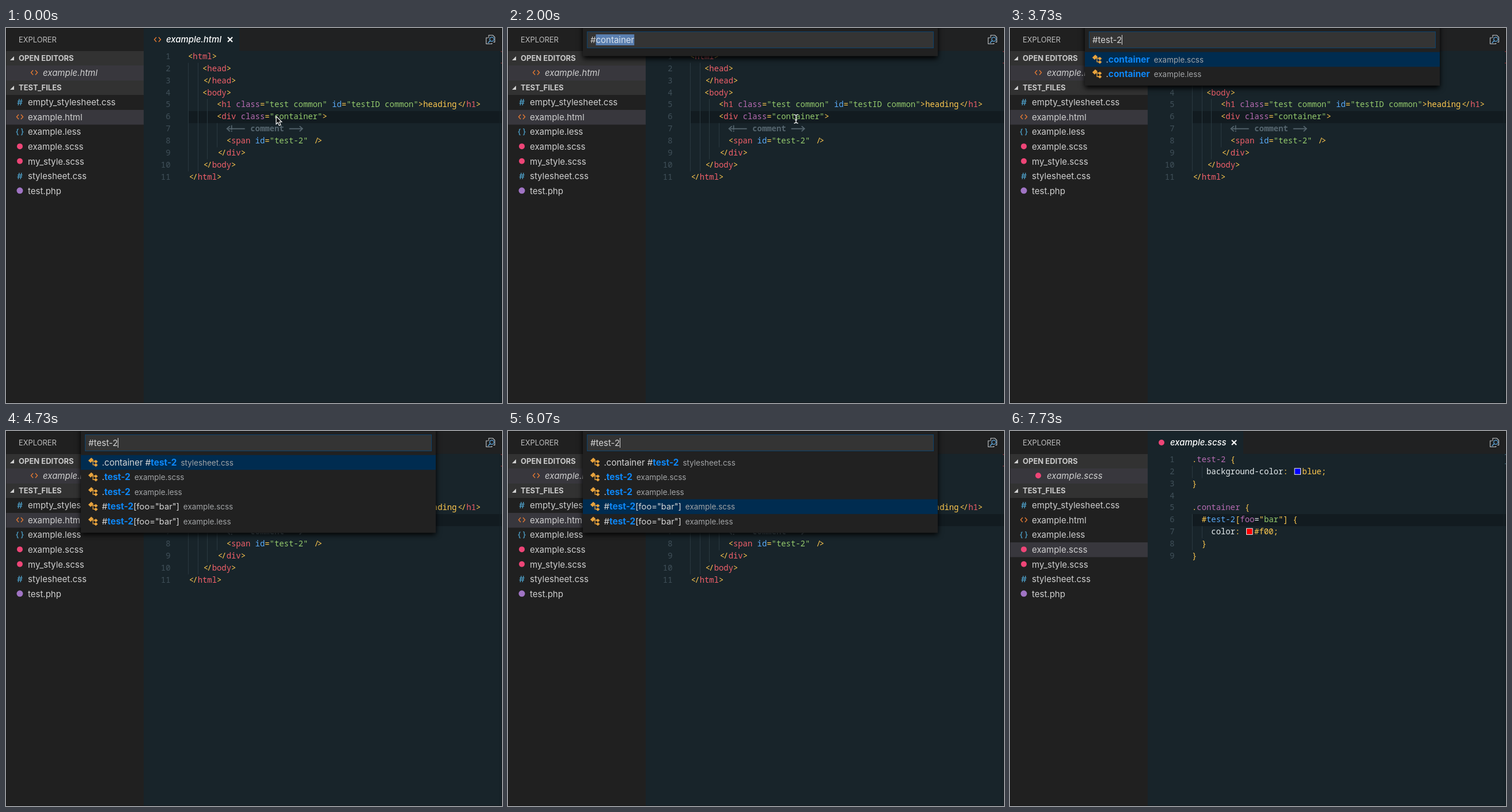
Recreate the animation shown at these times as an HTML page with a canvas. Size 861 by 650 pixels, loop 7.87 s.

```html
<!DOCTYPE html>
<html lang="en">
<head>
<meta charset="utf-8">
<title>Symbol search</title>
<style>
html, body { margin: 0; width: 100%; height: 100%; overflow: hidden; background: #18242a; }
canvas { display: block; width: 861px; height: 650px; }
</style>
</head>
<body>
<canvas id="stage"></canvas>
<script>
const W = 861, H = 650, LOOP = 7870;
const canvas = document.getElementById('stage');
const ctx = canvas.getContext('2d');
const dpr = window.devicePixelRatio || 1;
canvas.width = W * dpr;
canvas.height = H * dpr;

const UI = 'Inter, Roboto, sans-serif';
const MONO = '"Noto Sans Mono", "DejaVu Sans Mono", monospace';
const CODE_X = 316, CHAR = 8.33, LINE = 20.87, CODE_TOP = 39.5, ROW = 25.55;

const COLORS = {
  y: '#ffc94f', r: '#f0606a', p: '#b76cb3', b: '#5aaaf6',
  g: '#93c96c', w: '#e9eff1', c: '#56666f'
};

// Each line: indent columns, then runs marked by ~ and a colour key.
const HTML_LINES = [
  [0, '~y<~rhtml~y>'],
  [3, '~y<~rhead~y>'],
  [3, '~y</~rhead~y>'],
  [3, '~y<~rbody~y>'],
  [6, '~y<~rh1 ~pclass~y=~g"test common" ~bid~y=~g"testID common"~y>~yheading~y</~rh1~y>'],
  [6, '~y<~rdiv ~pclass~y=~g"container"~y>'],
  [8, ''],
  [8, '~y<~rspan ~bid~y=~g"test-2" ~y/>'],
  [6, '~y</~rdiv~y>'],
  [3, '~y</~rbody~y>'],
  [0, '~y</~rhtml~y>']
];
const SCSS_LINES = [
  [0, '~y.~ptest-2 ~y{'],
  [3, '~wbackground-color~y:'],
  [0, '~y}'],
  [0, ''],
  [0, '~y.~pcontainer ~y{'],
  [2, '~y#~btest-2~y[~pfoo~w=~y"~gbar~y"] {'],
  [4, '~wcolor~y:'],
  [2, '~y}'],
  [0, '~y}']
];

const FILES = [
  ['empty_stylesheet.css', 'hash'], ['example.html', 'angle'],
  ['example.less', 'brace'], ['example.scss', 'pink'],
  ['my_style.scss', 'pink'], ['stylesheet.css', 'hash'], ['test.php', 'violet']
];

// Result: text before the match, match, text after, file.
const FIRST_RESULTS = [
  ['.', 'container', '', 'example.scss'],
  ['.', 'container', '', 'example.less']
];
const NEXT_RESULTS = [
  ['.container #', 'test-2', '', 'stylesheet.css'],
  ['.', 'test-2', '', 'example.scss'],
  ['.', 'test-2', '', 'example.less'],
  ['#', 'test-2', '[foo="bar"]', 'example.scss'],
  ['#', 'test-2', '[foo="bar"]', 'example.less']
];

const POINTER = [
  [600, 469, 153], [760, 514, 150], [870, 504, 156], [1000, 507, 157], [1270, 504, 157]
];

function rect(x, y, w, h, color) {
  ctx.fillStyle = color;
  ctx.fillRect(x, y, w, h);
}

function text(str, x, y, font, color, align = 'left') {
  ctx.font = font;
  ctx.fillStyle = color;
  ctx.textAlign = align;
  ctx.fillText(str, x, y);
  return ctx.measureText(str).width;
}

const label = (str, x, y, color, style = '', size = 15) =>
  text(str, x, y, `${style} ${size}px ${UI}`, color);

function path(points, { fill, stroke, width = 1, close = false }) {
  ctx.beginPath();
  points.forEach(([x, y]) => ctx.lineTo(x, y));
  if (close) ctx.closePath();
  if (fill) { ctx.fillStyle = fill; ctx.fill(); }
  if (stroke) { ctx.strokeStyle = stroke; ctx.lineWidth = width; ctx.stroke(); }
}

function disc(x, y, r, color) {
  ctx.beginPath();
  ctx.arc(x, y, r, 0, Math.PI * 2);
  ctx.fillStyle = color;
  ctx.fill();
}

function fileIcon(kind, x, y) {
  if (kind === 'hash') text('#', x, y + 5.3, `600 15px ${UI}`, '#4a97bd', 'center');
  if (kind === 'brace') text('{ }', x, y + 4, `600 12.5px ${UI}`, '#4a97bd', 'center');
  if (kind === 'pink') disc(x, y, 5, '#ee4577');
  if (kind === 'violet') disc(x, y, 5.5, '#a074c4');
  if (kind === 'angle') {
    for (const s of [-1, 1]) {
      path([[x + s * 2, y - 4], [x + s * 5.5, y], [x + s * 2, y + 4]], { stroke: '#e37933', width: 1.4 });
    }
  }
}

function twistie(y) {
  path([[14, y - 3.5], [14, y + 3.5], [7, y + 3.5]], { fill: '#d0d0d0', close: true });
}

function drawSidebar(file, selected, focused) {
  rect(0, 0, 239, H, '#202020');
  label('EXPLORER', 22, 24.8, '#bdbdbd', '', 12.9);
  rect(0, 40, 239, 25, '#323232');
  rect(0, 65, 239, 26, '#38373d');
  rect(0, 91, 239, 25, '#323232');
  twistie(52.5);
  label('OPEN EDITORS', 22, 57, '#cacaca', '700', 13);
  fileIcon(file[1], 49, 77.3);
  label(file[0], 64, 83, '#cfcfcf', 'italic');
  twistie(103.5);
  label('TEST_FILES', 22, 108, '#cacaca', '700', 13);
  FILES.forEach(([name, kind], i) => {
    const mid = 129.2 + i * ROW, chosen = name === selected;
    if (chosen) rect(0, mid - 12.8, 239, ROW, focused ? '#003c66' : '#38373d');
    fileIcon(kind, 24, mid - 0.7);
    label(name, 38, mid + 5.1, chosen && focused ? '#ffffff' : '#cfcfcf');
  });
}

function drawTabs(file) {
  rect(239, 0, W - 239, 39.5, '#202122');
  rect(239, 0, 166, 40, '#18242a');
  fileIcon(file[1], 263, 20);
  label(file[0], 278, 25.1, '#ffffff', 'italic 500', 14.9);
  for (const s of [-1, 1]) {
    path([[389 - 4 * s, 16], [389 + 4 * s, 24]], { stroke: '#ffffff', width: 2.2 });
  }
  // Search button
  const grey = { stroke: '#bfc3c6', width: 1.1 }, blue = '#5ba6dc';
  path([[837, 17], [833.5, 17], [833.5, 27.5], [843.5, 27.5], [843.5, 26]], grey);
  path([[838, 17], [838, 12.5], [845, 12.5], [848.5, 16], [848.5, 24.5], [846, 24.5]], grey);
  ctx.beginPath();
  ctx.arc(843.3, 19.5, 3.6, 0, Math.PI * 2);
  ctx.strokeStyle = blue;
  ctx.lineWidth = 1.3;
  ctx.stroke();
  path([[840.8, 22], [836.5, 26]], { stroke: blue, width: 1.5 });
}

function drawRun(str, x, y, color) {
  const font = `500 13.88px ${MONO}`;
  if (str === '</' || str === '/>') {
    const [a, b] = str === '</' ? [1.8, -0.2] : [2.5, -0.3];
    text(str[0], x + a, y, font, color);
    text(str[1], x + CHAR + b, y, font, color);
  } else {
    text(str, x, y, font, color);
  }
}

function drawComment(y) {
  const x = CODE_X + 8 * CHAR, mid = y - 4.5, ink = { stroke: COLORS.c, width: 1.8 };
  path([[x + 6, mid - 4.5], [x + 1, mid], [x + 6, mid + 4.5]], ink);
  path([[x + 9, mid - 6], [x + 9, mid + 2]], ink);
  path([[x + 9, mid + 3.3], [x + 9, mid + 5.2]], ink);
  path([[x + 3, mid], [x + 32, mid]], ink);
  text('comment', x + 5 * CHAR, y, `700 13.88px ${MONO}`, COLORS.c);
  path([[x + 109, mid], [x + 131, mid]], ink);
  path([[x + 127, mid - 4.5], [x + 132, mid], [x + 127, mid + 4.5]], ink);
}

function swatch(x, y, color) {
  rect(x, y, 11.5, 11.5, '#f0f0f0');
  rect(x + 1, y + 1, 9.5, 9.5, color);
}

const lineTop = n => CODE_TOP + (n - 1) * LINE;
const baseline = n => lineTop(n) + 14.4;

function drawCode(isHtml) {
  const lines = isHtml ? HTML_LINES : SCSS_LINES;
  rect(239, 39.5, W - 239, H - 39.5, '#18242a');
  rect(317, Math.round(lineTop(6)), W - 317, 21, '#121b20');
  rect(857, 40, 1, H - 40, '#142026');
  const mark = isHtml ? '#8d3238' : '#42697e';
  rect(859, 40, 2, 1.5, mark);
  rect(859, isHtml ? 60 : 56, 2, 1.5, mark);

  lines.forEach(([indent, runs], i) => {
    const base = baseline(i + 1);
    text(String(i + 1), 285.5, base, `13.88px ${MONO}`, '#405059', 'right');
    for (let c = 0; c < indent; c += 2) {
      rect(Math.round(CODE_X + c * CHAR), lineTop(i + 1), 1, LINE + 0.3, '#2a3940');
    }
    let col = indent;
    for (const run of runs.split('~').slice(1)) {
      const str = run.slice(1);
      drawRun(str, CODE_X + col * CHAR, base, COLORS[run[0]]);
      col += str.length;
    }
  });

  if (isHtml) {
    drawComment(baseline(7));
  } else {
    swatch(493.5, 64.3, '#0000ff');
    drawRun('blue;', 507.3, baseline(2), COLORS.y);
    swatch(410, 168.4, '#ff0000');
    drawRun('#f00;', 424, baseline(7), COLORS.y);
  }
}

function diamond(x, y, rx, ry) {
  path([[x - rx, y], [x, y - ry], [x + rx, y], [x, y + ry]], { fill: '#e8a33d', close: true });
}

function symbolIcon(y) {
  path([[149, y - 3], [151, y - 2.5], [151, y + 4], [155, y + 4]], { stroke: '#e8a33d', width: 1.3 });
  path([[149, y - 2.5], [156, y - 2.5]], { stroke: '#e8a33d', width: 1.3 });
  path([[142.8, y - 3.5], [148, y - 8.5], [152, y - 5], [147, y + 0.5]], { fill: '#e8a33d', close: true });
  diamond(156, y - 1.8, 3.4, 3);
  diamond(156, y + 4.3, 3.4, 3);
}

function drawPanel(p) {
  ctx.save();
  ctx.shadowColor = '#000';
  ctx.shadowBlur = 9 * dpr;
  ctx.shadowOffsetY = 4 * dpr;
  rect(130, -10, 616, 58.7 + p.results.length * ROW, '#212121');
  ctx.restore();

  rect(137, 6, 602, 29, '#0c426d');
  rect(138, 7, 600, 27, '#343434');
  let x = 143 + label('#', 143, 25.7, '#d4d4d4');
  if (p.selected) {
    rect(x, 11, label('container', x, 25.7, '#d4d4d4'), 19, '#5a7fb0');
    label('container', x, 25.7, '#d9e2ec');
  } else {
    x += label(p.query, x, 25.7, '#d4d4d4');
    if (p.caret) rect(Math.round(x), 12, 1, 17, '#d8d8d8');
  }

  p.results.forEach(([before, match, after, file], i) => {
    const top = 41.7 + i * ROW, base = top + 18.1;
    if (i === p.row) rect(130, top, 616, ROW, '#002c50');
    symbolIcon(top + 13);
    let end = 166.5;
    end += label(before, end, base, '#d6d6d6');
    end += label(match, end, base, '#0d87f7', '700', 15.4);
    end += label(after, end, base, '#d6d6d6', '', 14.7);
    label(file, end + 7, base, '#a2a4a6', '', 13.45);
  });
}

function drawArrow(x, y) {
  const shape = [[0, 0], [0, 13.5], [3, 10.8], [5.2, 16], [7.8, 14.9], [5.6, 9.9], [9.6, 9.7]];
  path(shape.map(([a, b]) => [x + a, y + b]), { fill: '#080808', stroke: '#f4f4f4', width: 1.3, close: true });
}

function drawBeam(x, y) {
  const ink = { stroke: '#f0f0f0', width: 1.4 };
  path([[x, y - 6], [x, y + 6.5]], ink);
  path([[x - 3.5, y - 7.5], [x, y - 6], [x + 3.5, y - 7.5]], ink);
  path([[x - 3.5, y + 8], [x, y + 6.5], [x + 3.5, y + 8]], ink);
  path([[x - 2, y + 2], [x + 2, y + 2]], ink);
}

function pointerAt(t) {
  let prev = POINTER[0];
  if (t <= prev[0]) return prev.slice(1);
  for (const next of POINTER) {
    if (t < next[0]) {
      const k = (t - prev[0]) / (next[0] - prev[0]), e = k * k * (3 - 2 * k);
      return [1, 2].map(i => prev[i] + (next[i] - prev[i]) * e);
    }
    prev = next;
  }
  return prev.slice(1);
}

const between = (t, a, b) => t >= a && t < b;

function draw(t) {
  const isHtml = t < 6270;
  const file = FILES[isHtml ? 1 : 3];
  ctx.setTransform(dpr, 0, 0, dpr, 0, 0);
  drawCode(isHtml);
  drawTabs(file);
  drawSidebar(file, file[0], between(t, 600, 1270));
  if (between(t, 6330, 6870) || between(t, 7330, 7600)) {
    rect(331, Math.round(lineTop(6)), 1.5, 21, '#ffc94f');
  }

  if (t < 1270) drawArrow(...pointerAt(t));
  else if (t < 3200) drawBeam(500, 157.3);

  if (between(t, 1670, 6200)) {
    drawPanel({
      selected: t < 3200,
      query: 'test-2'.slice(0, 1 + Math.floor((t - 3200) / 106)),
      caret: !between(t, 4270, 4730) && !between(t, 5200, 5730),
      results: t < 2400 ? [] : t < 4270 ? FIRST_RESULTS : NEXT_RESULTS,
      row: [5200, 5600, 5930].filter(time => t >= time).length
    });
  }
  ctx.strokeStyle = 'rgba(0,0,0,0.35)';
  ctx.lineWidth = 1;
  ctx.strokeRect(0.5, 0.5, W - 1, H - 1);
}

const start = performance.now();
function tick() {
  draw((performance.now() - start) % LOOP);
  requestAnimationFrame(tick);
}
tick();
</script>
</body>
</html>
```
